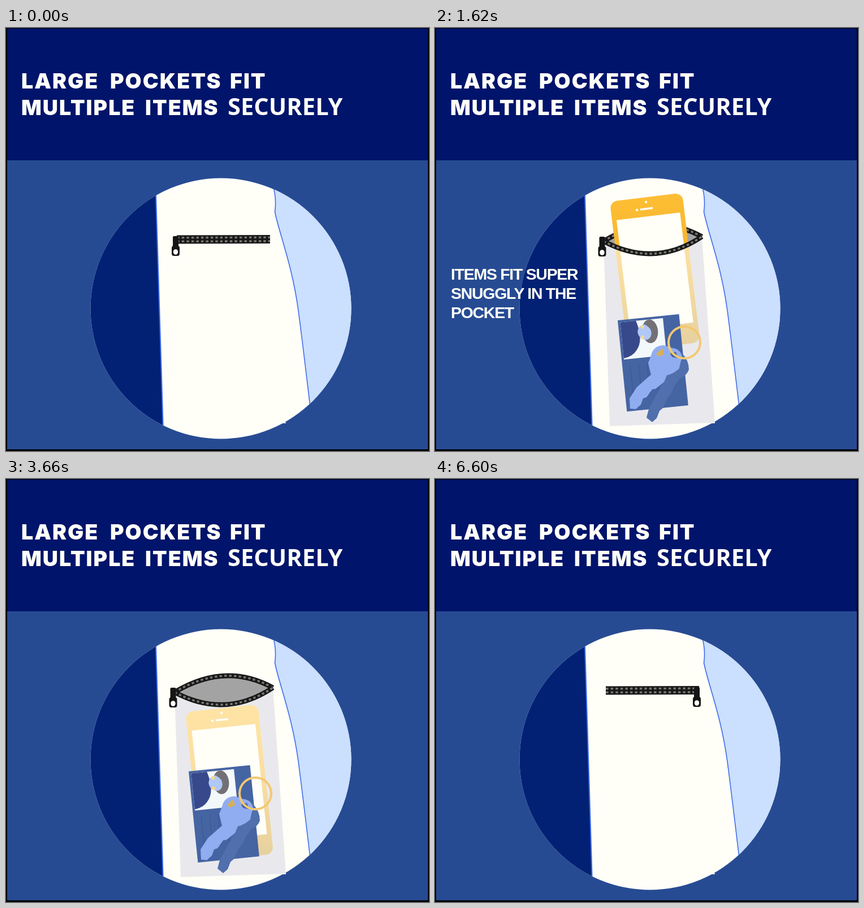
An HTML page with a canvas that plays this animation: 748 by 748 pixels, repeating every 7200 ms.

```html
<!DOCTYPE html>
<html lang="en">
<head>
<meta charset="utf-8">
<title>Large pockets</title>
<style>
html, body { margin: 0; width: 100%; height: 100%; overflow: hidden; background: #000; }
canvas, svg { position: absolute; left: 0; top: 0; width: 100vw; height: 100vh; display: block; }
text { fill: #fffff8; }
.title { font: 900 37.5px Inter, sans-serif; letter-spacing: 2px; font-optical-sizing: none; }
.title .alt { font: 700 41.5px "Open Sans", "Noto Sans", sans-serif; letter-spacing: .1px; }
.note { font: 700 28.5px "Liberation Sans", sans-serif; letter-spacing: -1.3px; }
.small { font-size: 26.4px; letter-spacing: -1.4px; }
</style>
</head>
<body>
<canvas id="stage" width="748" height="748"></canvas>
<svg viewBox="0 0 748 748">
  <g class="title">
    <text y="107"><tspan x="27">LARGE</tspan> <tspan x="184">POCKETS</tspan> <tspan x="396">FIT</tspan></text>
    <text y="154"><tspan x="27">MULTIPLE</tspan> <tspan x="246">ITEMS</tspan></text>
    <text class="alt" x="392" y="154">SECURELY</text>
  </g>
  <g id="snug" class="note">
    <text x="28" y="445">ITEMS FIT SUPER</text>
    <text x="28" y="479">SNUGGLY IN THE</text>
    <text x="28" y="513">POCKET</text>
  </g>
  <g id="flex" class="note small">
    <text x="27" y="445">THE POCKET IS</text>
    <text x="27" y="476">MADE OF FLEXIBLE</text>
    <text x="27" y="507">FABRIC SO YOU</text>
    <text x="27" y="538">CAN RUN WITHOUT</text>
    <text x="27" y="569">CONSTRAINT</text>
  </g>
</svg>
<script>
const LOOP = 7200, STEP = 30;
const ctx = document.getElementById('stage').getContext('2d');
const snug = document.getElementById('snug'), flex = document.getElementById('flex');

const WHITE = [255, 255, 248], GOLD = [253, 190, 52], NAVY = [0, 22, 108];
const clamp = v => Math.max(0, Math.min(1, v));
const lerp = (a, b, k) => a + (b - a) * k;
const span = (t, from, to) => clamp((t - from) / (to - from));
const smooth = k => k * k * (3 - 2 * k);
const remaining = (t, from, to) => (1 - span(t, from, to)) ** 2;

// Colour blended towards the fabric white.
const tint = (c, k = 1) => `rgb(${c.map((v, i) => Math.round(lerp(WHITE[i], v, k)))})`;

// Piecewise linear value from [time, value] stops.
function track(stops, t) {
  if (t <= stops[0][0]) return stops[0][1];
  for (let i = 1; i < stops.length; i++) {
    const [t0, v0] = stops[i - 1], [t1, v1] = stops[i];
    if (t <= t1) return lerp(v0, v1, (t - t0) / (t1 - t0));
  }
  return stops[stops.length - 1][1];
}

const TIP = [[2430, -20], [2550, 232], [2610, 320], [2700, 407], [2910, 153], [3090, -65]];
const OUTLINE = [[4230, 0], [4350, 1], [5000, 1], [5460, .25], [5700, 1], [5950, 1], [6120, 0]];

function fill(path, color, rule = 'nonzero') {
  ctx.fillStyle = color;
  ctx.fill(typeof path === 'string' ? new Path2D(path) : path, rule);
}
function stroke(path, color, width, dash = []) {
  ctx.strokeStyle = color;
  ctx.lineWidth = width;
  ctx.setLineDash(dash);
  ctx.stroke(typeof path === 'string' ? new Path2D(path) : path);
  ctx.setLineDash([]);
}
function oval(x, y, rx, ry = rx) {
  const p = new Path2D();
  p.ellipse(x, y, rx, ry, 0, 0, Math.PI * 2);
  return p;
}
function box(x, y, w, h, r = 0) {
  const p = new Path2D();
  p.roundRect(x, y, w, h, r);
  return p;
}
function at(x, y, degrees, draw) {
  ctx.save();
  ctx.translate(x, y);
  ctx.rotate(degrees * Math.PI / 180);
  draw();
  ctx.restore();
}
function clipped(path, draw) {
  ctx.save();
  ctx.clip(new Path2D(path));
  draw();
  ctx.restore();
}

function drawScene() {
  fill(box(0, 0, 748, 748), '#000');
  fill(box(2, 1, 744, 744), '#274b93');
  fill(box(2, 1, 744, 233), '#00146b');
  fill('M486 690 L494 696 L495 699 L488 699 Z', tint(WHITE));
  const leg = 'M264.500 280 L278.500 730';
  const hip = 'M471 275 Q479 300 475.500 325 C482 360 506 418 517 500 Q525 560 545 730';
  clipped(oval(380, 496, 230.5), () => {
    fill(box(140, 260, 480, 480), tint(WHITE));
    fill(leg + ' H140 V280 Z', '#022175');
    fill(hip + ' H620 V275 Z', '#cbdfff');
    stroke(leg, '#3f6bea', 2);
    stroke(hip, '#3f6bea', 1.6);
  });
}

function zipperShape(open) {
  const left = [lerp(302, 298, open), lerp(374, 377, open)];
  const right = [lerp(467, 472, open), lerp(373.5, 369, open)];
  const gap = 3.3 * (1 - open);
  const row = side => {
    const y = 374 + side * (51 * open + gap);
    return `M${left[0]} ${left[1] + side * gap} Q388 ${y} ${right[0]} ${right[1] + side * gap}`;
  };
  return { left, right, upper: row(-1), lower: row(1) };
}

function teeth(path) {
  stroke(path, '#171717', 8.5);
  stroke(path, '#77756f', 3.6, [4.5, 4]);
}

function drawPull(x, y) {
  fill(box(x - 5, y - 6, 10, 13, 2), '#151515');
  const tab = box(x - 5, y + 5, 10, 9, 2);
  tab.addPath(box(x - 7, y + 11, 14, 18, 4));
  fill(tab, '#151515');
  fill(oval(x, y + 22, 4.2, 4.8), tint(WHITE));
}

function drawPhone(fall, push, k) {
  const x = lerp(309, 317, push) - fall * 14.6;
  const y = lerp(307, 412, push) - fall * 560;
  at(x, y, lerp(-6.9, -6, push), () => {
    const body = ctx.createLinearGradient(0, 0, 0, 266);
    body.addColorStop(0, tint(GOLD, k));
    body.addColorStop(.45, tint([244, 180, 48], k));
    body.addColorStop(1, tint([200, 148, 40], k));
    fill(box(0, 0, 129, 266, 13), body);
    fill(box(8, 34, 113, 196), tint(WHITE));
    fill(oval(64.500, 248, 10), tint([220, 165, 45], k));
    fill(oval(63.500, 8.500, 2.2), tint(WHITE));
    fill(oval(46, 20.500, 2.2), tint(WHITE));
    stroke('M52 20.300 H74', tint(WHITE), 3.5);
  });
}

function drawCard(fall, k) {
  const faint = k * k;
  at(323 - fall * 14, 517 - fall * 690, -5.8, () => {
    fill(box(0, 0, 109, 162), tint([16, 56, 138], k));
    fill(box(4, 4, 76, 66), tint([222, 237, 255], faint * .6));
    fill('M4 4 H32 Q43 40 27 57 Q20 66 4 68 Z', tint(NAVY, k));
    fill(oval(55, 25, 14, 21), tint([25, 20, 32], faint));
    fill('M33 24 Q35 12 47 12 Q59 20 57 30 Q54 41 44 39 Q33 35 33 24 Z', tint([125, 165, 246], faint));
    fill(oval(42, 16, 3), tint(GOLD, faint));
    fill(oval(41, 34, 3), tint(GOLD, faint));
    for (let x = 14; x < 80; x += 15) stroke(`M${x} 80 V138`, tint([6, 40, 120], k), 1);
    fill(oval(74, 66, 13.5), tint([202, 152, 45], k));
  });
}

const DARK_KEY = 'M437 575 Q449 588 449 604 Q445 615 434 619 L424 632 L418 646 L411 654 L403 672 L397 677 L392 690 L384 697 L374 689 L378 674 L396 640 L405 622 L415 600 Z';
const LIGHT_KEY = 'M377 592 Q381 583 384 573 Q390 561 405 561 L420 566 Q434 567 437 582 Q433 594 432 602 Q421 612 410 614 L405 626 L390 638 L384 639 L374 653 L368 655 L364 666 L355 674 L345 673 L344 655 L357 635 L382 613 Q379 602 377 592 Z'
  + ' M391 576 L402 566 L405 577 L396 581 Z M414 575 L426 573 L430 584 L420 582 Z';

function drawKeys(fall, k) {
  at(0, -fall * 700, 0, () => {
    fill(DARK_KEY, tint([30, 70, 150], k));
    fill(LIGHT_KEY, tint([114, 150, 239], k), 'evenodd');
    stroke(oval(441, 556, 28), tint([240, 185, 75], k), 4);
  });
}

function drawItems(t, push, k, phoneK) {
  const drop = remaining(t, 1170, 1620);
  drawPhone(drop, push, phoneK);
  drawCard(drop, k);
  drawKeys(remaining(t, 990, 1440), k);
}

function drawHand(tip) {
  at(0, tip - 232, 0, () => {
    fill('M175 -270 L198 -60 L194 0 L188 57 Q188 80 209 82 Q229 80 233 58 L236 45 L237 88 Q240 112 264 113 Q280 113 289 105 Q293 130 316 131 Q333 131 342 122 V206 Q344 232 369 232 Q395 231 396 206 V-8 L401 0 L430 48 Q440 66 456 63 Q473 56 468 38 L450 0 L422 -60 L410 -270 Z', tint(GOLD));
    fill('M350 199 Q351 194 357 193 Q369 187 381 193 Q387 195 387 199 V217 Q380 226 369 226 Q357 226 350 217 Z', tint(WHITE));
  });
}

function drawOutline(t) {
  const alpha = track(OUTLINE, t);
  if (!alpha) return;
  const bulge = Math.abs(Math.sin(Math.PI * Math.max(0, t - 4350) / 1110));
  ctx.globalAlpha = alpha;
  stroke(`M302 381 Q${310 - 266 * bulge} 541 318 700 L480 693 Q${475 + 298 * bulge} 538 470 381`, '#9a9a9f', .9);
  ctx.globalAlpha = 1;
}

function draw(t) {
  const open = t < 3675 ? smooth(span(t, 0, 750)) : 0;
  const { left, right, upper, lower } = zipperShape(open);
  const tip = track(TIP, t);
  const push = t > 2700 ? 1 : clamp((tip - 302) / 105);
  const k = lerp(.3, .78, span(t, 1380, 1620)) * (1 - span(t, 6150, 6600));

  drawScene();
  if (open) fill(`${upper} L${right} Q388 ${374 + 51 * open} ${left} Z`, '#a3a3a3');
  teeth(upper);

  if (t >= 990 && t < 3675) {
    clipped(`${lower} L748 ${right[1]} V0 H0 V${left[1]} Z`, () => drawItems(t, push, 1, 1));
  }
  if (t > 2430 && t < 3090) drawHand(tip);

  ctx.globalAlpha = open;
  fill(`${lower} L495 698 L309 704 Z`, '#e9e9ed');
  ctx.globalAlpha = 1;
  if (t >= 990 && t < 6600) {
    clipped(`${lower} L748 ${right[1]} V748 H0 V${left[1]} Z`, () => drawItems(t, push, k, k * .55));
  }
  drawOutline(t);
  teeth(lower);

  const slide = smooth(span(t, 3900, 4290));
  drawPull(lerp(lerp(300, 295.5, open), 463, slide), 374 + open);

  snug.style.opacity = span(t, 1560, 1620) * (1 - span(t, 3210, 3270));
  flex.style.opacity = span(t, 3870, 3930) * (1 - span(t, 6120, 6180));
}

const start = performance.now();
function tick() {
  const elapsed = Math.max(0, performance.now() - start) % LOOP;
  draw(Math.floor(elapsed / STEP) * STEP);
  requestAnimationFrame(tick);
}
tick();
</script>
</body>
</html>
```
